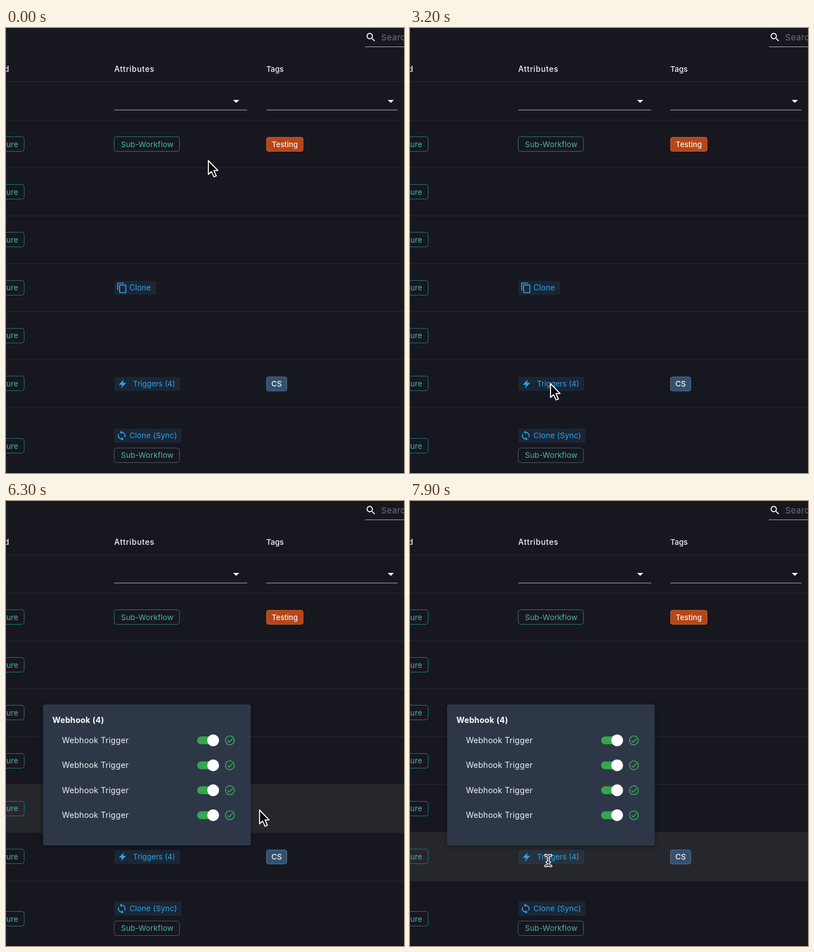
Write an HTML page that moves like this. It is 708 px wide and 792 px high and loops after 8 s.

```html
<!DOCTYPE html>
<html lang="en">
<head>
<meta charset="utf-8">
<title>Workflow table</title>
<style>
html, body { margin: 0; width: 100%; height: 100%; overflow: hidden; background: #171720; }
svg { display: block; width: 708px; height: 792px; }
text { font-family: Inter, "Open Sans", sans-serif; }
</style>
</head>
<body>
<svg id="stage" viewBox="0 0 708 792"></svg>
<script>
const stage = document.getElementById('stage');
const TEAL = '#46b8ab', BLUE = '#30a3e9', GREEN = '#35a64e';
const LOOP = 8000, STEP = 100;

function add(tag, attrs, parent = stage) {
  const el = document.createElementNS('http://www.w3.org/2000/svg', tag);
  for (const key in attrs) el.setAttribute(key, attrs[key]);
  return parent.appendChild(el);
}
function label(str, x, y, size, fill, opts = {}, parent = stage) {
  add('text', { x, y, 'font-size': size, fill, ...opts }, parent).textContent = str;
}
function box(x, y, width, height, fill, opts = {}, parent = stage) {
  return add('rect', { x, y, width, height, fill, ...opts }, parent);
}
function hline(x1, x2, y, stroke) {
  add('line', { x1, x2, y1: y, y2: y, stroke, 'stroke-width': 1 });
}
function icon(d, x, y, fill) {
  add('path', { d, fill, transform: `translate(${x} ${y}) scale(.85)` });
}
function outlineChip(str, x, cy, w, stroke) {
  box(x, Math.round(cy) - 13.5, w, 26, 'none', { rx: 4, stroke });
  label(str, x + w - 10.5, cy + 4.6, 13.6, TEAL, { 'text-anchor': 'end', 'letter-spacing': .15 });
}
function blueChip(cy, w) {
  box(193, cy - 12.5, w, 25, BLUE, { rx: 3, 'fill-opacity': .1 });
}
function tag(str, x, cy, w, fill, stroke, size) {
  box(x, cy - 12.5, w, 25, fill, { rx: 3.5, stroke });
  label(str, x + w / 2, cy + 4.6, size, '#f4f4f6', { 'text-anchor': 'middle', 'font-weight': 500 });
}

// Table
const edges = [164, 249, 334.5, 419.5, 504.5, 590, 676, 791];
const centers = [207, 292, 377, 462.5, 547.5, 633, 744];
const hover = box(0, 0, 708, 0, '#26272d');
[95.5, ...edges].forEach(y => hline(0, 708, y, '#282932'));
box(0, 790.5, 708, 1.5, '#0d0d13');

// Header and filters
icon('M15.5 14h-.79l-.28-.27C15.41 12.59 16 11.11 16 9.5 16 5.91 13.09 3 9.5 3S3 5.91 3 9.5 5.91 16 9.5 16c1.61 0 3.09-.59 4.23-1.57l.27.28v.79l5 4.99L20.49 19l-4.99-5zm-6 0C7.01 14 5 11.99 5 9.5S7.01 5 9.5 5 14 7.01 14 9.5 11.99 14 9.5 14z', 639, 6.3, '#fff');
label('Search', 667.5, 22, 15, '#70717a', { 'letter-spacing': .5 });
hline(638.5, 708, 33.5, '#a9a9ae');
const head = { 'font-weight': 500 };
label('Published', 5.5, 77.5, 14, '#f2f2f4', { ...head, 'text-anchor': 'end' });
label('Attributes', 192.5, 77.5, 13.9, '#f2f2f4', { ...head, 'letter-spacing': .65 });
label('Tags', 463, 77.5, 13.5, '#f2f2f4', head);
[[192.5, 429, 404], [463, 696.5, 679]].forEach(([x1, x2, caret]) => {
  hline(x1, x2, 146, '#b4b4b9');
  add('path', { d: `M${caret} 128h11l-5.5 5.3z`, fill: '#fff' });
});

// Row contents
centers.forEach(cy => outlineChip('Configure', -60, cy, 92.3, '#1f7876'));
outlineChip('Sub-Workflow', 192.5, 207, 116, '#2b7775');
tag('Testing', 463.5, 207, 65, '#b74618', '#c2622f', 13.2);

blueChip(462.5, 74);
icon('M16 1H4c-1.1 0-2 .9-2 2v14h2V3h12V1zm3 4H8c-1.1 0-2 .9-2 2v14c0 1.1.9 2 2 2h11c1.1 0 2-.9 2-2V7c0-1.1-.9-2-2-2zm0 16H8V7h11v14z', 196.2, 452.3, BLUE);
label('Clone', 219.5, 467.3, 13.9, BLUE);

blueChip(633.5, 117);
add('path', { d: 'M209.5 625.5L200.5 635H206.5L204.5 641L214 631.5H208Z', fill: BLUE });
label('Triggers (4)', 226, 637.8, 13.4, BLUE);
tag('CS', 463.5, 633.5, 36, '#34506f', '#567595', 13.6);

blueChip(725.5, 119);
icon('M12 4V1L8 5l4 4V6c3.31 0 6 2.69 6 6 0 1.01-.25 1.97-.7 2.8l1.46 1.46C19.54 15.03 20 13.57 20 12c0-4.42-3.58-8-8-8zm0 14c-3.31 0-6-2.69-6-6 0-1.01.25-1.97.7-2.8L5.24 7.74C4.46 8.97 4 10.43 4 12c0 4.42 3.58 8 8 8v3l4-4-4-4v3z', 195.6, 715.3, BLUE);
label('Clone (Sync)', 219.5, 730.4, 13.6, BLUE, { 'letter-spacing': .15 });
outlineChip('Sub-Workflow', 192.5, 760.5, 116, '#4a5b61');

// Popup with toggles
const POP = { x: 66, y: 362, w: 369.5, h: 251 };
const popup = add('g', { style: 'filter:drop-shadow(0 2px 4px rgba(0,0,0,.4))' });
box(POP.x, POP.y, POP.w, POP.h, '#2d3748', { rx: 4 }, popup);
label('Webhook (4)', 82.5, 394.5, 14.1, '#fff', { 'font-weight': 700, 'letter-spacing': .3 }, popup);
const toggles = [426, 470.4, 514.8, 559.2];
toggles.forEach(cy => {
  label('Webhook Trigger', 99.5, cy + 5, 14.2, '#f2f4f7', { 'letter-spacing': .2 }, popup);
  box(340, cy - 7, 35, 14, GREEN, { rx: 7 }, popup);
  add('circle', { cx: 368.5, cy, r: 10.5, fill: '#fff' }, popup);
});
const checks = add('g', { fill: 'none', stroke: GREEN, 'stroke-width': 1.7 }, popup);
toggles.forEach(cy => {
  add('circle', { cx: 398.2, cy, r: 7.9 }, checks);
  add('path', { d: `M394 ${cy + .2}l3 3l6.2-6.4` }, checks);
});

// Pointers, with the hot spot at the origin
const arrow = add('path', {
  d: 'M0 0V24.5L5.5 19.5L9.8 29L14 27.2L9.8 17.6H17Z',
  fill: '#08080c', stroke: '#fff', 'stroke-width': 1.8, 'stroke-linejoin': 'round'
});
const beam = add('g', { fill: 'none', 'stroke-linecap': 'round' });
[['#fff', 4.4], ['#101015', 1.5]].forEach(([stroke, width]) => add('path', {
  d: 'M-5 -9.5Q-1 -9.5 0 -7Q1 -9.5 5 -9.5M0 -7V7M-5 9.5Q-1 9.5 0 7Q1 9.5 5 9.5M-2.5 3H2.5',
  stroke, 'stroke-width': width
}, beam));

// Pointer path: time, x, y
const path = [
  [0, 360, 236], [500, 360, 236], [1100, 296, 470], [1900, 292, 476],
  [2800, 254, 628], [3200, 250, 633], [3600, 250, 633], [4100, 264, 636],
  [4600, 264, 634], [5300, 384, 520], [5600, 384, 520], [6300, 451, 550],
  [6600, 448, 556], [7200, 333, 618], [7500, 250, 638], [7900, 246, 640], [LOOP, 246, 640]
];
function pointerAt(t) {
  const i = path.findIndex((p, n) => n > 0 && t < p[0]);
  const [t0, x0, y0] = path[i - 1], [t1, x1, y1] = path[i];
  const u = (t - t0) / (t1 - t0), e = u * u * (3 - 2 * u);
  return [x0 + (x1 - x0) * e, y0 + (y1 - y0) * e];
}
const show = (el, on) => el.setAttribute('visibility', on ? 'visible' : 'hidden');

function draw(time) {
  const t = Math.floor(time % LOOP / STEP) * STEP;
  const [x, y] = pointerAt(t);
  const active = t >= 3700;
  const open = t >= 3800 && t < 6700 || t >= 7600;
  const inPopup = open && x > POP.x && x < POP.x + POP.w && y > POP.y && y < POP.y + POP.h;
  const onText = active && !inPopup && x > 226 && x < 301 && y > 623 && y < 645;

  const row = edges.findIndex((top, i) => y >= top && y < edges[i + 1]);
  const hot = active && !inPopup && row >= 0;
  show(hover, hot);
  if (hot) {
    hover.setAttribute('y', edges[row]);
    hover.setAttribute('height', edges[row + 1] - edges[row]);
  }
  show(popup, open);
  show(checks, open && t >= 4400);
  show(arrow, !onText);
  show(beam, onText);
  (onText ? beam : arrow).setAttribute('transform', `translate(${x} ${y})`);
}

const start = performance.now();
function tick() {
  draw(performance.now() - start);
  requestAnimationFrame(tick);
}
tick();
</script>
</body>
</html>
```
